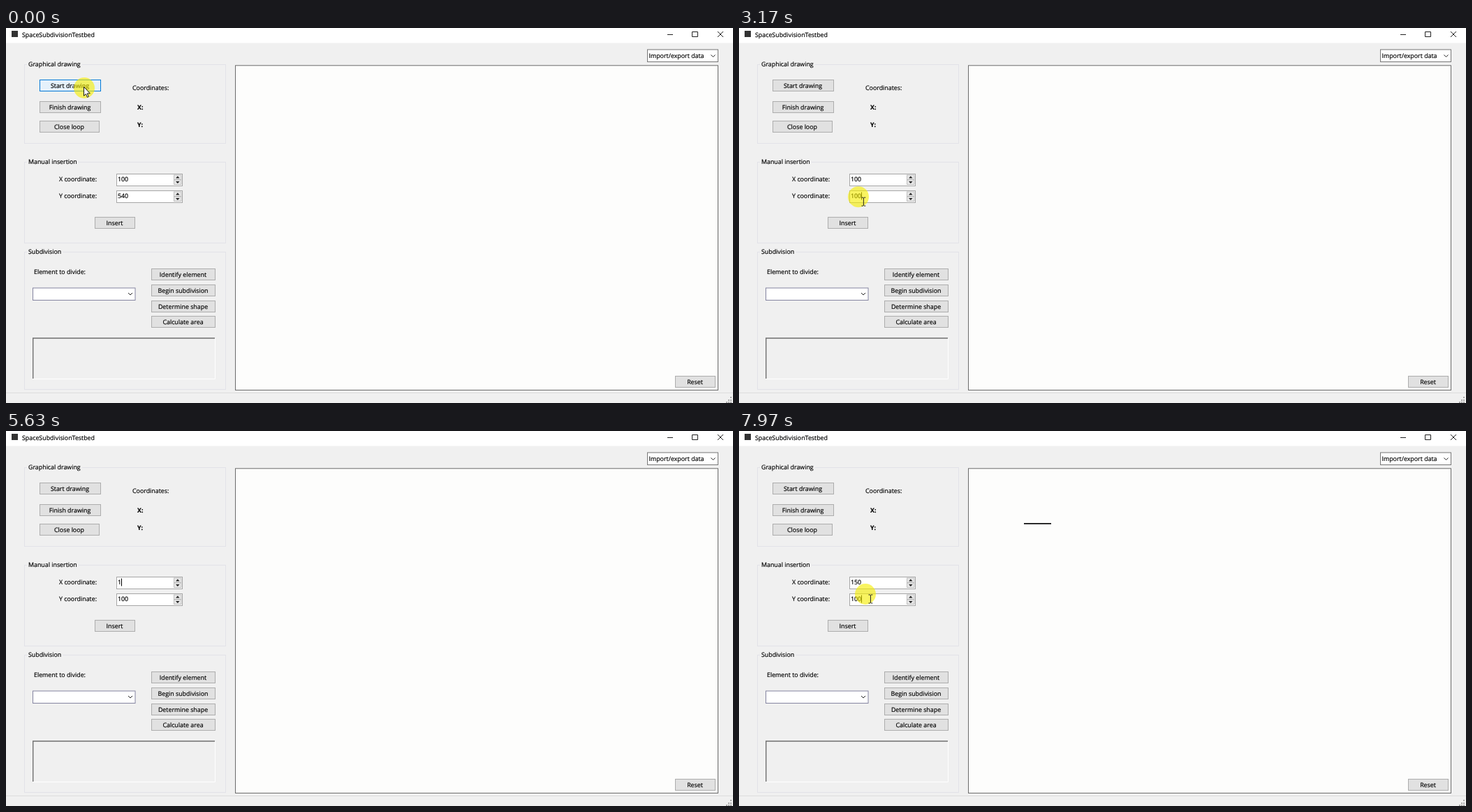
An HTML page for the animation above (8000 ms loop, 1041x538 px).

```html
<!DOCTYPE html>
<html lang="en">
<head>
<meta charset="utf-8">
<title>SpaceSubdivisionTestbed</title>
<style>
html, body { margin: 0; width: 100%; height: 100%; overflow: hidden; background: #f0f0f0; }
svg { display: block; width: 100%; height: 100%; }
text { font: 8.85px "Open Sans", sans-serif; fill: #000; stroke: #000; stroke-width: .18; text-rendering: geometricPrecision; }
.selected { fill: #fff; stroke: #fff; }
.bold { font-weight: 700; }
.mid { text-anchor: middle; }
.line { fill: none; stroke: #222; }
.group { fill: none; stroke: #e2e2e8; }
.field { fill: #fff; stroke: #a6a6a6; }
.btn .face { fill: #e1e1e1; stroke: #adadad; }
.btn .ring { fill: none; stroke: none; stroke-width: 2; }
.btn.focus .ring { stroke: #0078d7; }
.btn.hover .face { fill: #e5f1fb; stroke: #0078d7; }
.btn.press .face { fill: #cce4f7; stroke: #005499; }
.btn.hover .ring { stroke: none; }
</style>
</head>
<body>
<svg viewBox="0 0 1041 538" preserveAspectRatio="none">
  <rect width="1041" height="538" fill="#f0f0f0"/>
  <rect width="1041" height="21.5" fill="#fff"/>
  <rect x="8" y="4" width="9" height="9" fill="#333"/>
  <path class="line" d="M947 9.5h8M982.5 5.5h8v7h-8zM1019 5l8 8m0-8l-8 8"/>
  <path d="M0 523.5H1041" stroke="#dcdcdc"/>
  <path d="M1037 530h2m-5 4h2m1 0h2m-8 3h2m1 0h2m1 0h2" stroke="#a8a8a8" stroke-width="2"/>
  <rect x="328.5" y="53.8" width="691" height="465.7" fill="#fdfdfc" stroke="#6b6b6b"/>
  <path id="segment" d="M408 132.8h39" stroke="#111" stroke-width="1.7"/>
  <rect x="918.5" y="31" width="101" height="17.5" fill="#fff" stroke="#777"/>
  <rect x="38.5" y="373" width="146.5" height="17.5" fill="#fff" stroke="#8484a0"/>
  <path class="line" d="M1009.5 38.5l3 3 3-3M175 380l3 3 3-3"/>
  <path d="M38.5 503.5h261v-58" fill="none" stroke="#fff"/>
  <path d="M38.7 503V445H299" fill="none" stroke="#707070" stroke-width="1.4"/>
  <g id="controls"></g>
  <rect id="selection" height="13" fill="#0078d7"/>
  <g id="values"></g>
  <path id="caret" d="M0-5v11" stroke="#000"/>
  <g id="pointer">
    <circle r="15" fill="#f5ee00" fill-opacity=".62"/>
    <path id="arrow" d="M-.5-1.5v12.8l2.9-2.7 2 4.7 1.9-.8-2-4.6h4z" fill="#fff" stroke="#000" stroke-width=".9"/>
    <path id="beam" class="line" d="M4.5 1h2l.9.8.9-.8h2M7.4 1.5v11M4.5 13h2l.9-.8.9.8h2"/>
  </g>
</svg>
<script>
const LOOP = 8000, KEY_DELAY = 200, BLINK = 530, DRAG_TIME = 200, DRAG_LENGTH = 40, PRESS_TIME = 120;
const $ = id => document.getElementById(id);

function set(el, attrs) {
  for (const key in attrs) el.setAttribute(key, attrs[key]);
}
function add(parent, tag, attrs, content = '') {
  const el = document.createElementNS('http://www.w3.org/2000/svg', tag);
  set(el, attrs);
  el.textContent = content;
  return parent.appendChild(el);
}
const controls = $('controls');
const label = (x, y, content, cls = '', parent = controls) =>
  add(parent, 'text', { x, y: y + 3.2, class: cls }, content);

function groupBox(y, height, title) {
  add(controls, 'rect', { x: 26.5, y: y + .5, width: 288, height, class: 'group' });
  const gap = add(controls, 'rect', { x: 30, y: y - 2, height: 5, fill: '#f0f0f0' });
  set(gap, { width: label(32, y, title).getComputedTextLength() + 4 });
}

function button(x, y, width, title) {
  const el = add(controls, 'g', { class: 'btn' });
  add(el, 'rect', { x: x + .5, y: y + .5, width: width - 1, height: 16, class: 'face' });
  add(el, 'rect', { x: x + 1, y: y + 1, width: width - 2, height: 15, class: 'ring' });
  label(x + width / 2 - .5, y + 8.5, title, 'mid', el);
  const contains = p => p.x >= x && p.x <= x + width && p.y >= y && p.y <= y + 17;
  return { el, contains };
}

function numberField(y, title) {
  label(76, y + 7.5, title);
  add(controls, 'rect', { x: 158.5, y: y + .5, width: 94, height: 17, class: 'field' });
  for (const dy of [2, 9])
    add(controls, 'rect', { x: 240.5, y: y + dy, width: 10.5, height: 6.5, fill: '#e8e8e8', stroke: '#b4b4b4', 'stroke-width': .8 });
  add(controls, 'path', { d: `M243 ${y + 6.5}l2.8-3 2.8 3zM243 ${y + 11}l2.8 3 2.8-3z`, fill: '#222' });
  const contains = p => p.x >= 158 && p.x <= 240 && p.y >= y && p.y <= y + 18;
  return { y: y + 7.5, contains, text: label(160, y + 7.5, '', '', $('values')) };
}

label(23, 9.5, 'SpaceSubdivisionTestbed');
label(920.5, 39.5, 'Import/export data');
groupBox(52, 113, 'Graphical drawing');
groupBox(192, 116, 'Manual insertion');
groupBox(321, 197, 'Subdivision');
label(181, 86, 'Coordinates:');
label(188, 113.5, 'X:', 'bold');
label(188, 138.5, 'Y:', 'bold');
label(40, 350, 'Element to divide:');
const buttons = {
  start: button(48, 74, 88, 'Start drawing'),
  insert: button(127, 271, 58, 'Insert')
};
button(48, 105, 88, 'Finish drawing');
button(48, 133, 86, 'Close loop');
['Identify element', 'Begin subdivision', 'Determine shape', 'Calculate area']
  .forEach((title, i) => button(208, 345 + Math.round(i * 22.8), 92, title));
button(958, 499, 58, 'Reset');
const fields = { x: numberField(209, 'X coordinate:'), y: numberField(233, 'Y coordinate:') };

// Each edit selects a value by dragging, types over it, then presses Insert.
const edits = [
  { field: 'y', before: '540', after: '100', grab: 1830, type: 2400, back: 2930, insert: 3700 },
  { field: 'x', before: '100', after: '150', grab: 5030, type: 5600, back: 6400, insert: 6850 }
];
const lastClick = 7850;
const segmentStart = edits[1].insert + PRESS_TIME;

const home = { x: 112, y: 86 }, insertSpot = { x: 165, y: 279 };
const moves = [
  { start: 1000, end: 1800, to: { x: 171, y: 242 } },
  { start: 3170, end: 3570, to: insertSpot },
  { start: 4000, end: 4400, to: { x: 170, y: 214 } },
  { start: 6400, end: 6570, to: { x: 177, y: 267 } },
  { start: 6570, end: 6800, to: insertSpot },
  { start: 7230, end: 7970, to: { x: 181, y: 234 } }
];

const progress = (t, start, end) => Math.min(1, Math.max(0, (t - start) / (end - start)));
const easeOut = u => 1 - (1 - u) ** 2.1;
const within = (t, start, end) => t >= start && t < end;

function pointerAt(t) {
  let { x, y } = home;
  for (const { start, end, to } of moves) {
    const k = easeOut(progress(t, start, end));
    x += (to.x - x) * k;
    y += (to.y - y) * k;
  }
  const drag = edits.find(e => within(t, e.grab, e.back));
  if (drag) x -= DRAG_LENGTH * easeOut(progress(t, drag.grab, drag.grab + DRAG_TIME));
  return { x, y };
}

function valueAt(t, { before, after, type }) {
  return t < type ? before : after.slice(0, 1 + Math.floor((t - type) / KEY_DELAY));
}

function focusAt(t) {
  if (t >= lastClick) return 'y';
  const edit = edits.findLast(e => t >= e.grab);
  if (!edit) return 'start';
  return t < edit.insert ? edit.field : 'insert';
}

function caretOn(t) {
  if (t >= lastClick) return true;
  const edit = edits.find(e => within(t, e.type, e.insert));
  if (!edit) return false;
  const lastKey = edit.type + (edit.after.length - 1) * KEY_DELAY;
  return t < lastKey || Math.floor((t - lastKey) / BLINK) % 2 === 0;
}

const show = (el, on) => set(el, { display: on ? 'inline' : 'none' });

function draw() {
  const t = performance.now() % LOOP;
  const p = pointerAt(t), focus = focusAt(t);
  const selecting = edits.some(e => within(t, e.grab, e.type));
  const typing = edits.some(e => within(t, e.type, e.back));
  const pressed = edits.some(e => within(t, e.insert, e.insert + PRESS_TIME));

  for (const name in buttons) {
    const { el, contains } = buttons[name];
    const hover = contains(p) && !typing;
    const states = { btn: true, focus: focus === name, hover, press: hover && pressed };
    set(el, { class: Object.keys(states).filter(key => states[key]).join(' ') });
  }

  for (const edit of edits) {
    const { text } = fields[edit.field];
    text.textContent = valueAt(t, edit);
    set(text, { class: '' });
  }

  const active = fields[focus];
  if (active) {
    const end = 160 + active.text.getComputedTextLength();
    const from = Math.min(end, Math.max(160, p.x + 7));
    set($('selection'), { x: from, y: active.y - 6, width: end - from });
    if (selecting && from < 168) set(active.text, { class: 'selected' });
    set($('caret'), { transform: `translate(${Math.round(end) + .5} ${active.y})` });
  }
  show($('selection'), active && selecting);
  show($('caret'), active && caretOn(t));
  show($('segment'), t >= segmentStart);

  const beam = selecting || Object.values(fields).some(field => field.contains(p));
  set($('pointer'), { transform: `translate(${p.x} ${p.y})` });
  show($('pointer'), !typing);
  show($('beam'), beam);
  show($('arrow'), !beam);
  requestAnimationFrame(draw);
}
draw();
</script>
</body>
</html>
```
